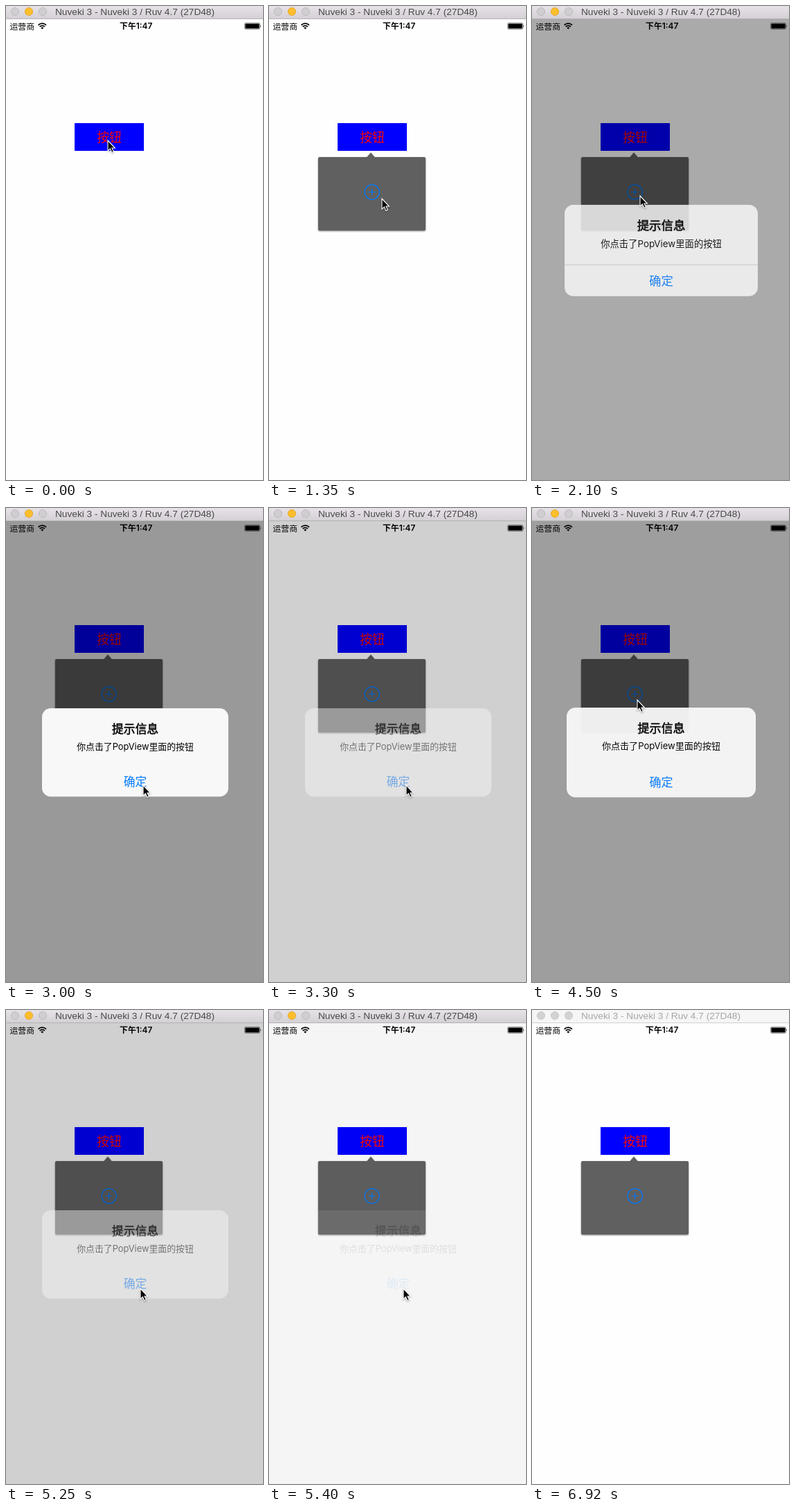
Animation, 371 px wide and 684 px high, one loop 7.02 s. Source, as an HTML page without scripts:

```html
<!DOCTYPE html>
<html lang="zh-CN">
<head>
<meta charset="utf-8">
<title>Pop view</title>
<style>
  html, body { margin: 0; width: 371px; height: 684px; overflow: hidden; background: #fefefe; }
  svg { display: block; }
  text { font-family: Inter, "Noto Sans CJK SC", "Noto Sans CJK", sans-serif; }
  .mid { text-anchor: middle; }
  .strong { font-weight: 600; }
  .medium { stroke: #000; stroke-width: .5; }
  .window-title { font: 13.66px "Liberation Sans", Arial, sans-serif; }
  .status { font-size: 11.87px; }

  .popup, .plus, .fade, .alert, .rule, .veil, .cursor, .inactive {
    animation: 7.02s step-end infinite;
  }
  .popup { animation-name: popup; filter: drop-shadow(0 1px 1px rgba(0, 0, 0, .5)); }
  .plus { animation-name: press; }
  .fade { animation-name: fade; }
  .alert { animation-name: settle; transform-origin: 186.5px 352.5px; }
  .rule { animation-name: rule; }
  .veil { animation-name: veil; }
  .cursor { animation-name: pointer; }
  .inactive { animation-name: inactive; }

  @keyframes popup {
    0% { opacity: 0; }
    4.27% { opacity: .35; }
    6.41% { opacity: .9; }
    8.54%, 100% { opacity: 1; }
  }
  @keyframes press {
    0%, 27.77%, 61.96%, 100% { opacity: 1; }
    23.5%, 59.82% { opacity: .2; }
  }
  /* Shared by the dimming layer and the alert */
  @keyframes fade {
    0%, 51.28%, 79.05%, 100% { opacity: 0; }
    27.77% { opacity: .25; }
    29.91% { opacity: .83; }
    32.05%, 66.23% { opacity: 1; }
    44.87%, 72.64% { opacity: .85; }
    47%, 74.78% { opacity: .45; }
    49.14%, 76.92% { opacity: .09; }
    61.96% { opacity: .5; }
    64.1% { opacity: .95; }
  }
  @keyframes settle {
    0%, 32.05%, 66.23%, 100% { transform: scale(1); }
    27.77% { transform: scale(1.15); }
    29.91% { transform: scale(1.037); }
    61.96% { transform: scale(1.1); }
    64.1% { transform: scale(1.015); }
  }
  @keyframes rule {
    0%, 32.05%, 100% { opacity: 0; }
    27.77% { opacity: 1; }
  }
  @keyframes veil {
    0%, 61.96%, 100% { opacity: 0; }
    59.82% { opacity: 1; }
  }
  @keyframes inactive {
    0% { opacity: 0; }
    98.57%, 100% { opacity: 1; }
  }
  @keyframes pointer {
    0% { transform: translate(147px, 194px); opacity: 1; }
    8.54% { transform: translate(151px, 212px); }
    10.68% { transform: translate(163px, 255px); }
    12.82% { transform: translate(171px, 283px); }
    17.09% { transform: translate(168px, 281px); }
    19.23% { transform: translate(163px, 278px); }
    21.36% { transform: translate(158px, 275px); }
    23.5% { transform: translate(156px, 274px); }
    32.05% { transform: translate(158px, 281px); }
    34.18% { transform: translate(166px, 312px); }
    36.32% { transform: translate(181px, 355px); }
    38.46% { transform: translate(193px, 388px); }
    40.59% { transform: translate(198px, 400px); }
    49.14% { transform: translate(194px, 388px); }
    51.28% { transform: translate(179px, 347px); }
    53.41% { transform: translate(159px, 299px); }
    55.55% { transform: translate(147px, 273px); }
    64.1% { transform: translate(152px, 277px); }
    66.23% { transform: translate(161px, 306px); }
    68.37% { transform: translate(181px, 365px); }
    70.51% { transform: translate(194px, 402px); }
    79.05% { transform: translate(200px, 412px); }
    81.19% { transform: translate(226px, 452px); }
    83.33% { transform: translate(282px, 540px); }
    85.47% { transform: translate(326px, 606px); }
    89.74%, 100% { transform: translate(326px, 606px); opacity: 0; }
  }
</style>
</head>
<body>
<svg width="371" height="684" viewBox="0 0 371 684">
  <defs>
    <linearGradient id="chrome" x2="0" y2="1">
      <stop stop-color="#e6e2e7"/>
      <stop offset="1" stop-color="#d3cfd4"/>
    </linearGradient>
    <circle id="dot" cy="8" r="5.6"/>
  </defs>

  <rect width="371" height="684" fill="#fefefe"/>
  <path class="veil" d="M0 19H5V420H371V684H0z" fill="#fbfbfb"/>

  <!-- Status bar -->
  <g class="status">
    <text x="5.5" y="33.5">运营商</text>
    <text class="mid strong" x="187.7" y="33.2">下午1:47</text>
    <g fill="none" stroke="#000" stroke-width="1.7">
      <path d="M46.6 27.6a8 8 0 0 1 11.4 0M48.7 29.9a5 5 0 0 1 7.2 0"/>
      <path d="M52.3 33.6l-2-2.1a2.9 2.9 0 0 1 4 0z" fill="#000" stroke="none"/>
    </g>
    <rect x="344.5" y="24.5" width="22" height="9" rx="1.6" fill="none" stroke="#777" stroke-width=".8"/>
    <rect x="345.4" y="25.4" width="20.2" height="7.2" rx=".8"/>
    <path d="M367.4 27.3q1.6 1.7 0 3.4z"/>
  </g>

  <!-- Button and popup -->
  <rect x="99" y="169" width="100" height="40" fill="#00f"/>
  <text class="mid" x="149" y="195.5" font-size="17.8" fill="#f00">按钮</text>
  <g class="popup">
    <path d="M141 218.5L147 211.5 153 218.5z" fill="#606060"/>
    <rect x="71" y="218" width="155" height="106" rx="2" fill="#606060"/>
    <g class="plus" fill="none" stroke="#007aff" stroke-width="1.2">
      <circle cx="148.7" cy="268.5" r="10.6"/>
      <path d="M143.5 268.5h10M148.5 263.5v10"/>
    </g>
  </g>

  <!-- Alert -->
  <rect class="fade" y="19" width="371" height="665" fill-opacity=".4"/>
  <g class="fade">
    <g class="alert">
      <rect x="52" y="289" width="269" height="127.5" rx="12.5" fill="#f8f8f8"/>
      <text class="mid medium" x="186.5" y="324.5" font-size="16.8">提示信息</text>
      <text class="mid" x="186.5" y="348.5" font-size="12.86">你点击了PopView里面的按钮</text>
      <path class="rule" d="M52 372.8h269" stroke="#cdcdcf"/>
      <text class="mid" x="186.5" y="401.3" font-size="16.8" fill="#007aff">确定</text>
    </g>
  </g>

  <!-- Window bar -->
  <rect width="371" height="19" fill="url(#chrome)"/>
  <path d="M0 18.5H371" stroke="#b4b2b4"/>
  <g fill="#d0ced0" stroke="#b5b3b5" stroke-width=".8">
    <use href="#dot" x="13"/>
    <use href="#dot" x="33" fill="#fdbe2c" stroke="#e0a023"/>
    <use href="#dot" x="53"/>
  </g>
  <text class="window-title mid" x="186" y="13" fill="#4a484a">Nuveki 3 - Nuveki 3 / Ruv 4.7 (27D48)</text>
  <g class="inactive">
    <rect width="371" height="18" fill="#f6f6f6"/>
    <path d="M0 18.5H371" stroke="#d0d0d0"/>
    <g fill="#d2d2d2" stroke="#c4c4c4" stroke-width=".8">
      <use href="#dot" x="13"/>
      <use href="#dot" x="33"/>
      <use href="#dot" x="53"/>
    </g>
    <text class="window-title mid" x="186" y="13" fill="#a6a6a6">Nuveki 3 - Nuveki 3 / Ruv 4.7 (27D48)</text>
  </g>

  <g class="cursor">
    <path d="M0 0V15.1L3.4 12 5.9 17.4 8.3 16.3 6 11H10.4z" stroke="#fff" stroke-width="1.1" style="filter: drop-shadow(0 1px 1px rgba(0, 0, 0, .35))"/>
  </g>
</svg>
</body>
</html>
```
